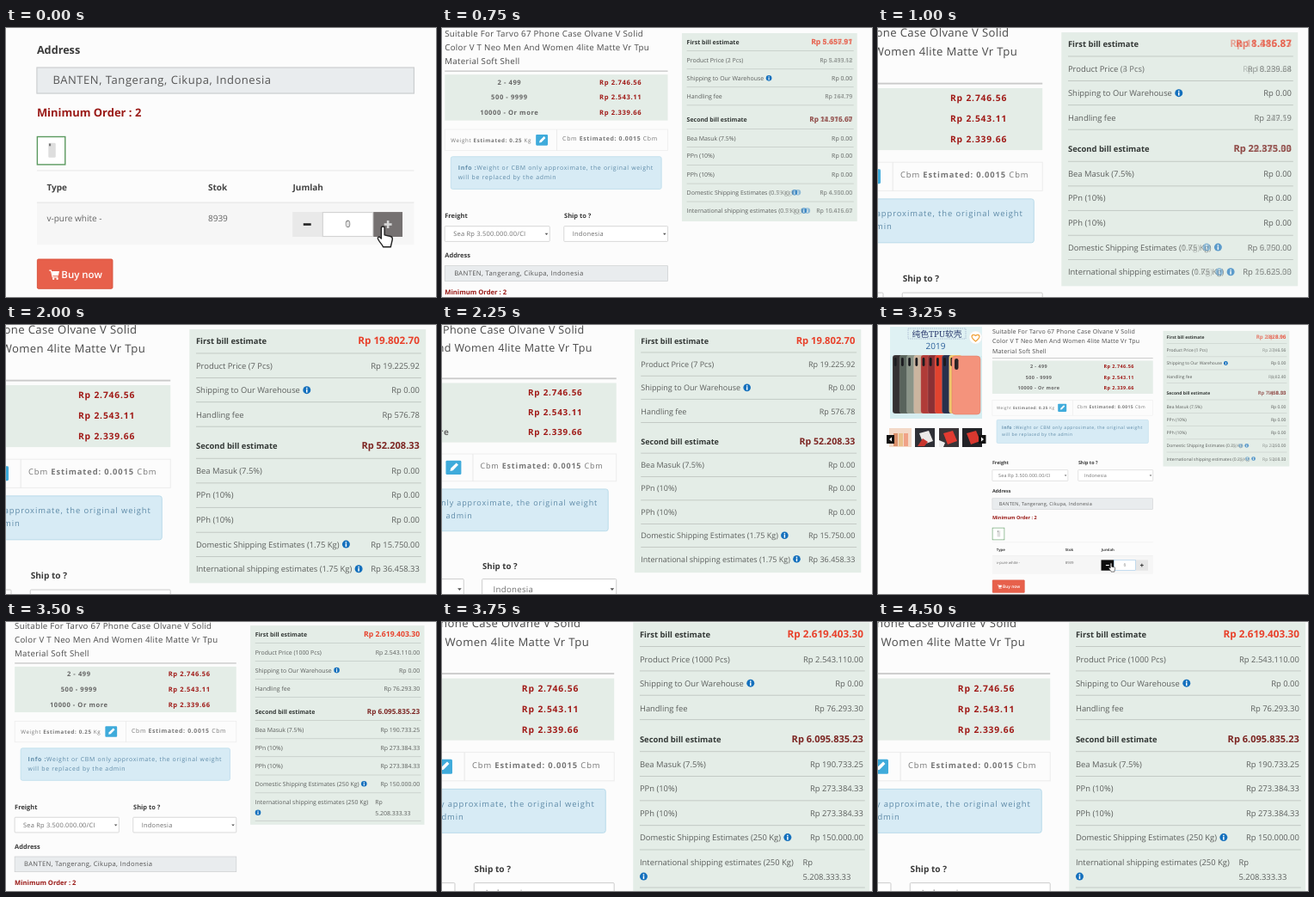
An HTML page that plays this animation: 500x313 px, repeating every 4750 ms.

```html
<!DOCTYPE html>
<html lang="en">
<head>
<meta charset="utf-8">
<title>Order estimate</title>
<style>
html, body { margin: 0; height: 100%; overflow: hidden; background: #fcfcfc; }
svg { display: block; width: 100vw; height: 100vh; }
text { font-family: "Open Sans", sans-serif; white-space: pre; text-rendering: geometricPrecision; }
.cjk { font-family: "Noto Serif", "Noto Sans CJK SC", "Noto Sans CJK", serif; }
</style>
</head>
<body>
<svg id="stage" viewBox="0 0 500 313" preserveAspectRatio="none">
  <g id="page"></g>
  <g id="bill"></g>
  <g id="order"></g>
</svg>
<script>
const $ = id => document.getElementById(id);
const stage = $('stage');

// Markup helpers
const rect = (x, y, w, h, fill, more = '') =>
  `<rect x="${x}" y="${y}" width="${w}" height="${h}" fill="${fill}" ${more}/>`;
const line = (x1, y, x2, color, w = 0.5) => rect(x1, y - w / 2, x2 - x1, w, color);
const path = (d, fill, more = '') => `<path d="${d}" fill="${fill}" ${more}/>`;
const circle = (x, y, r, fill, more = '') => `<circle cx="${x}" cy="${y}" r="${r}" fill="${fill}" ${more}/>`;
const text = (x, y, str, o = {}) =>
  `<text x="${x}" y="${y}" font-size="${o.size || 5.03}" fill="${o.fill || '#5c5f5d'}"` +
  ` font-weight="${o.bold ? 700 : o.weight || 400}" letter-spacing="${o.ls || 0}"` +
  ` text-anchor="${o.anchor || 'start'}" opacity="${o.alpha || 1}" class="${o.cls || ''}">${str}</text>`;
const bold = str => `<tspan font-weight="700">${str}</tspan>`;
const edge = (color, w = 0.5, r = 0) => `stroke="${color}" stroke-width="${w}" rx="${r}"`;

function textWidth(str) {
  const t = document.createElementNS('http://www.w3.org/2000/svg', 'text');
  t.setAttribute('font-size', 5.03);
  t.textContent = str;
  stage.append(t);
  const w = t.getComputedTextLength();
  t.remove();
  return w;
}

function photo() {
  const cases = ['#343032', '#59645c', '#8a9488', '#cbb59f', '#b03c38', '#8c3034', '#e2432f', '#28304c', '#f0c76c'];
  let s = rect(14, 2, 107, 107, '#d6edf0') + rect(14, 2, 107, 34, '#dff1f3');
  cases.forEach((c, i) => {
    const x = 17 + i * 8.2;
    s += rect(x, 35, 15, 68, c, edge('#ffffff55', 0.4, 3)) + rect(x + 1.8, 38, 2.8, 10, '#1b1b1f', 'rx="1.4"');
  });
  s += rect(86, 36, 33, 68, '#f4937c', edge('#dc7661', 0.5, 4)) + rect(89, 39, 4.5, 13, '#2a2426', 'rx="2.2"');
  s += rect(35, 4, 67, 12, 'none', `${edge('#7f8db5', 0.5)} stroke-dasharray="1.5 1"`);
  s += text(68.5, 13.6, '纯色TPU软壳', { size: 9.8, fill: '#2a3a6e', anchor: 'middle', cls: 'cjk' });
  s += text(67, 27.5, '2019', { size: 10, fill: '#2b5f9a', anchor: 'middle' });
  s += circle(113.5, 14.5, 7.5, '#fff', 'stroke="#e6e6e6" stroke-width=".5"');
  return s + path('M113.5 19C106 13.500 109.500 9.500 113.500 12.500C117.500 9.500 121 13.500 113.500 19Z', 'none',
    'stroke="#f0a23a" stroke-width="1.3"');
}

function thumbs() {
  let s = rect(13, 120, 26, 22, '#f3d9c8');
  ['#d98f6a', '#e9c08a', '#f0a287'].forEach((c, i) => { s += rect(18 + i * 6, 126, 5, 15, c); });
  [[43, '#2f3036', '#eceae8'], [71, '#3a3538', '#e23b31'], [98, '#222327', '#d8382f']].forEach(([x, bg, fg]) => {
    s += rect(x, 120, 23, 22, bg) + path(`M${x + 5} 126l11 -3l5 12l-11 4z`, fg);
  });
  s += path('M46 141l6 -9l6 4l-4 5z', '#c8372f') + path('M71 134l7 3l-2 5h-5z', '#eee');
  s += rect(10, 128, 9, 10, '#111') + rect(117, 128, 8.5, 10, '#111');
  return s + path('M16 130.500l-3 2.500l3 2.500zM120 130.500l3 2.500l-3 2.500z', '#fff');
}

function select(x, w, label) {
  return rect(x, 168.6, w, 12.8, '#fff', edge('#c9c9c9', 0.5, 0.6)) +
    text(x + 7.2, 177, label, { size: 5.4, ls: 0.15, fill: '#707070' }) +
    path(`M${x + w - 4} 174.500h2.600l-1.300 1.600z`, '#555');
}

function drawPage() {
  const L = 132.9, R = 319.7, W = R - L;
  const title = { size: 7, ls: 0.2, fill: '#4a4a4a' };
  const head = { size: 5.4, bold: 1, fill: '#3a3a3a' };
  const cell = { size: 4.27, fill: '#666' };
  const th = { size: 4.27, bold: 1, fill: '#444' };
  const info = { ls: 0.49, fill: '#5f8ba8' };
  let s = rect(-50, -50, 600, 420, '#fcfcfc') + photo() + thumbs();

  ['Suitable For Tarvo 67 Phone Case Olvane V Solid',
   'Color V T Neo Men And Women 4lite Matte Vr Tpu',
   'Material Soft Shell'].forEach((t, i) => { s += text(L, 9.7 + i * 11.5, t, title); });
  s += line(L, 38.6, R, '#cacaca', 1);

  s += rect(L, 41.5, W, 38.5, '#e4ede7');
  [['2 - 499', '2.746.56'], ['500 - 9999', '2.543.11'], ['10000 - Or more', '2.339.66']].forEach(([n, p], i) => {
    const y = 49.7 + i * 12.8;
    s += text(187, y, n, { size: 5.5, ls: 0.4, bold: 1, fill: '#666', anchor: 'middle' });
    s += text(262.4, y, 'Rp ' + p, { size: 5.5, ls: 0.45, bold: 1, fill: '#a01a17' });
  });

  s += rect(L, 87.5, W, 17.7, 'none', edge('#ebebeb')) + rect(226.5, 87.5, 0.5, 17.7, '#e6e6e6');
  s += text(138, 98, `Weight ${bold('Estimated: 0.25')} Kg`, { size: 4.5, ls: 0.45, fill: '#777' });
  s += rect(209.2, 91.8, 10, 9.1, '#3fabdb', 'rx=".8"') +
    path('M212 98.600l.4 -1.800l3.600 -3.500l1.300 1.300l-3.500 3.600z', '#fff');
  s += text(231.5, 97.1, `Cbm ${bold('Estimated: 0.0015')} Cbm`, { size: 5, ls: 0.47, fill: '#777' });

  s += rect(138, 110.3, 176.4, 27.2, '#d7ebf5', edge('#b6d9e9', 0.5, 1.5));
  s += text(144, 121.2, bold('Info :') + 'Weight or CBM only approximate, the original weight', info);
  s += text(144, 129.1, 'will be replaced by the admin', info);

  s += text(L, 161.9, 'Freight', head) + text(232.9, 161.9, 'Ship to ?', head);
  s += select(L, 87.9, 'Sea Rp 3.500.000.00/CI') + select(232.7, 87, 'Indonesia');
  s += text(L, 195, 'Address', head);
  s += rect(L, 201.8, W, 12.8, '#e9ecee', edge('#cbcdcf'));
  s += text(140.8, 210.1, 'BANTEN, Tangerang, Cikupa, Indonesia', { size: 5.54, ls: 0.24, fill: '#555' });
  s += text(L, 225.9, 'Minimum Order : 2', { size: 5.53, bold: 1, fill: '#9a1a17' });

  s += rect(133.1, 236.1, 13.8, 13.8, '#fff', edge('#5b9a5f', 0.6));
  s += rect(138.6, 239.2, 3.6, 7.2, '#dedede', 'rx=".5"') + rect(138.9, 239.5, 0.9, 1.2, '#777');

  s += line(L, 252.9, R, '#e6e6e6', 0.4);
  s += text(137.8, 262.7, 'Type', th) + text(217.7, 262.7, 'Stok', th) + text(259.7, 262.7, 'Jumlah', th);
  s += rect(L, 268.7, W, 20.9, '#f6f6f6') + line(L, 268.7, R, '#e2e2e2', 0.4);
  s += text(137.8, 278.1, 'v-pure white -', cell) + text(217.7, 278.1, '8939', cell);

  s += rect(133.1, 296.8, 37.3, 14.6, '#e7604b', edge('#d84f3a', 0.4, 0.6));
  s += path('M139 302.400h.9l.8 3.300h2.600', 'none', 'stroke="#fff" stroke-width=".5"') +
    path('M140.200 302.800h3.800l-.5 2.200h-2.800z', '#fff') +
    circle(141.1, 306.5, 0.5, '#fff') + circle(143, 306.5, 0.5, '#fff');
  s += text(145, 306.2, 'Buy now', { size: 4.9, weight: 600, fill: '#fff' });
  $('page').innerHTML = s;
}

const money = v => v.toFixed(2).replace(/\B(?=(\d{3})+\.)/g, '.');

// All amounts follow from the quantity
function estimate(n) {
  const price = n * (n < 500 ? 2746.56 : 2543.11), fee = price * 0.03, kg = n / 4;
  const taxed = n >= 500;
  const duty = taxed ? price * 0.075 : 0, tax = taxed ? (price + duty) * 0.1 : 0;
  const local = kg * (taxed ? 600 : 9000), abroad = kg * 62500 / 3;
  return {
    pcs: `(${n} Pcs)`, kg: `(${kg} Kg)`,
    sums: [price + fee, price, 0, fee, duty + 2 * tax + local + abroad, duty, tax, tax, local, abroad].map(money)
  };
}

const rows = [
  ['First bill estimate', 15.9, 21.7], ['Product Price ', 31.4, 36.9, 'pcs'],
  ['Shipping to Our Warehouse', 46.4, 52, '', 1], ['Handling fee', 61.9, 67.2],
  ['Second bill estimate', 81.1, 87], ['Bea Masuk (7.5%)', 96.6, 102.3],
  ['PPn (10%)', 111.6, 117.5], ['PPh (10%)', 127.1, 132.9],
  ['Domestic Shipping Estimates ', 142.2, 148, 'kg', 1],
  ['International shipping estimates ', 157.5, 0, 'kg', 1]
];

const badge = (x, y, alpha = 1) =>
  `<g opacity="${alpha}">` + circle(x, y, 2.4, '#1470bd') +
  rect(x - 0.4, y - 1.5, 0.8, 0.8, '#fff') + rect(x - 0.4, y - 0.4, 0.8, 2, '#fff') + '</g>';

// Two overlapping values show as a half-faded pair
const blend = (a, b, draw) => a === b ? draw(a, 1) : draw(a, 0.65) + draw(b, 0.4);

function drawBill(a, b) {
  const A = estimate(a), B = estimate(b), wrap = a >= 500;
  let s = rect(331.5, 6.8, 146.8, wrap ? 168 : 157.7, '#e4ede7');
  rows.forEach(([label, y, rule, unit, icon], i) => {
    const main = i === 0 || i === 4, last = i === 9;
    s += text(335.6, y, label, { bold: main, fill: main ? '#333836' : '#5c5f5d' });
    const end = 335.6 + textWidth(label + '|') - textWidth('|');
    s += blend(unit ? A[unit] : '', unit ? B[unit] : '', (t, alpha) => {
      const x = end + textWidth(t) + 4.2;
      return (t && text(end, y, t, { alpha })) +
        (icon ? (wrap && last ? badge(338, 164.6) : badge(x, y - 1.9, alpha)) : '');
    });
    const style = {
      anchor: 'end', bold: main, size: i === 0 ? 6.25 : i === 4 ? 5.9 : 5.03,
      fill: i === 0 ? '#e8402a' : i === 4 ? '#7c2522' : '#5c5f5d'
    };
    if (wrap && last) s += text(436.8, y, 'Rp') + text(436.8, 166.8, A.sums[i]);
    else s += blend(A.sums[i], B.sums[i], (t, alpha) => text(474.4, y, 'Rp ' + t, { ...style, alpha }));
    if (rule) s += line(335.6, rule, 475.4, '#bcc3be', 0.45);
  });
  if (wrap) s += line(335.6, 171.5, 475.4, '#bcc3be', 0.45);
  $('bill').innerHTML = s;
}

const hand = (x, y) => path('M2.200 .8c0 -1.100 1.600 -1.100 1.600 0v3.400l3 .7c.8 .2 1 .7 .9 1.500l-.5 2.200' +
  'c-.1 .6 -.3 .8 -.3 1.500h-3.800c-.2 -1 -1.600 -2 -2.500 -3.800c-.5 -1 .5 -1.500 1.100 -.8l.5 .5z', '#fff',
  `stroke="#222" stroke-width=".6" stroke-linejoin="round" transform="translate(${x - 3} ${y})"`);

function drawOrder(a, b, minus) {
  let s = rect(259.5, 273.4, 14.9, 12.3, minus ? '#0d0d0d' : '#e9e9e9');
  s += rect(299.5, 273.4, 14.5, 12.3, minus ? '#e6e6e6' : '#757171');
  s += rect(274.5, 273.6, 24.9, 11.9, '#fff', edge(minus ? '#8fbfe6' : '#d3d3d3'));
  s += rect(264.9, 279, 3.8, 1.1, minus ? '#fff' : '#222');
  const plus = minus ? '#444' : '#d8d8d8';
  s += rect(304.9, 279, 3.8, 1.1, plus) + rect(306.25, 277.65, 1.1, 3.8, plus);
  s += blend(a, b, (n, alpha) => text(287, 281.2, n, { size: 4.9, anchor: 'middle', fill: '#444', alpha }));
  $('order').innerHTML = s + (minus ? hand(271, 277) : hand(304.3, 280.6));
}

// Camera views: left, top, width
const full = [0, 0, 500], bill = [217.6, 4.1, 267], wide = [212.8, 6.5, 267], order = [117.6, 182.2, 213];
const between = (a, b, p) => a.map((v, i) => v + (b[i] - v) * p);

// View, quantity, fading-in quantity; one step each 250 ms
const STEP = 250;
const steps = [
  [order, 0, 1], [order, 1], [order, 2],
  [between(full, bill, 0.6), 2, 3],
  [bill, 3, 4], [bill, 4, 5], [bill, 5, 6], [bill, 6, 7], [bill, 7],
  [between(full, bill, 0.95), 7],
  [full, 1], [full, 1], [full, 1], [full, 1, 0],
  [between(full, wide, 0.59), 1000],
  [wide, 1000], [wide, 1000], [wide, 1000], [wide, 1000]
];

let shown = -1;
const start = performance.now();
function tick(now) {
  const i = Math.floor(Math.max(0, now - start) / STEP) % steps.length;
  if (i !== shown) {
    shown = i;
    const [[x, y, w], a, b = a] = steps[i];
    stage.setAttribute('viewBox', `${x} ${y} ${w} ${w * 0.626}`);
    drawBill(a, b);
    drawOrder(a, b, i >= 10);
  }
  requestAnimationFrame(tick);
}

drawPage();
tick(start);
</script>
</body>
</html>
```
